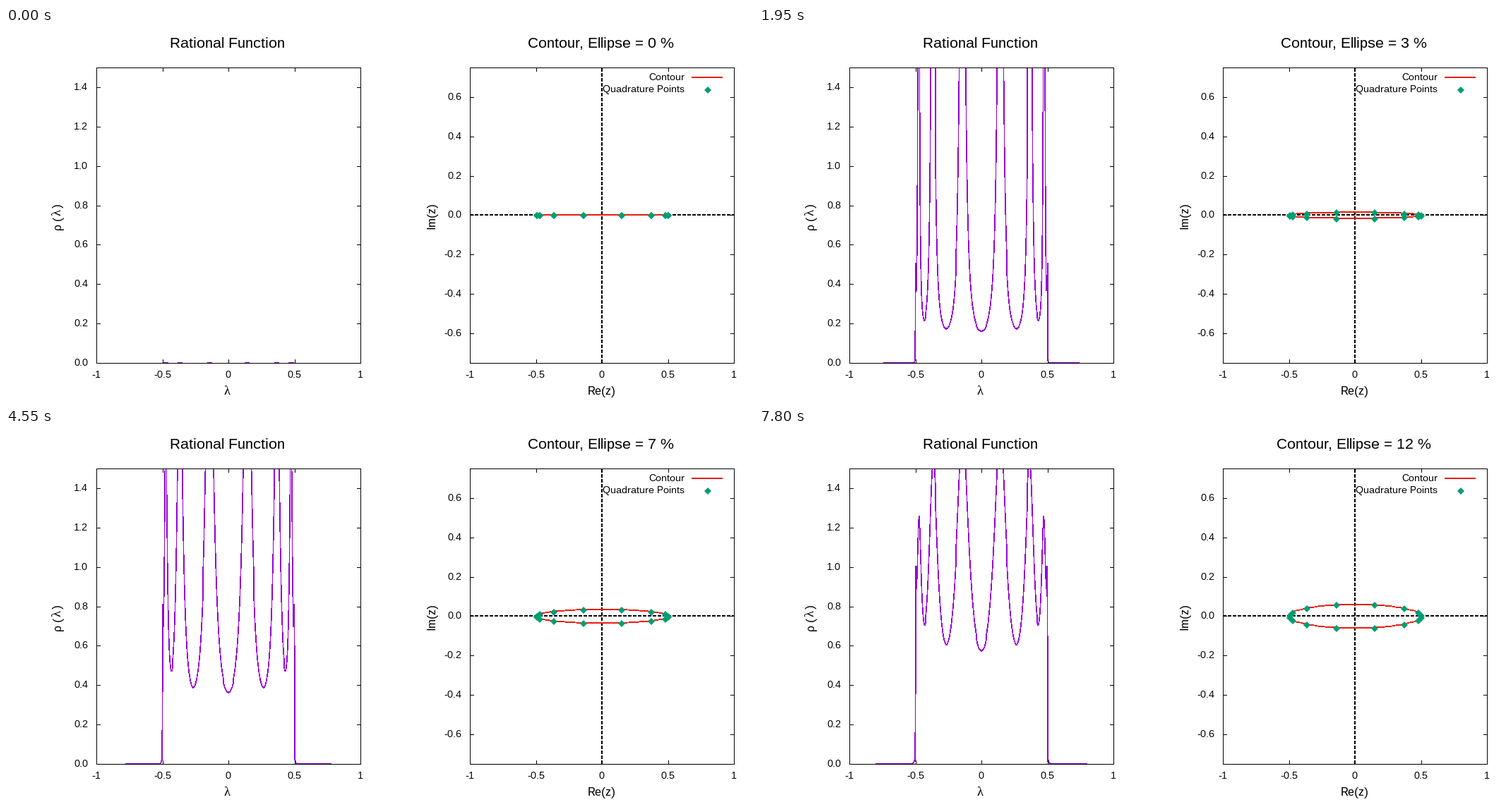
A matplotlib script for the animation above (8000 ms loop, 1058x529 px).

```python
import numpy as np
import matplotlib.pyplot as plt
from matplotlib.animation import FuncAnimation
from matplotlib.patches import Rectangle

W, H, DPI = 1058, 529, 64
PT = 72 / DPI                      # points per pixel
INTERVAL, LOOP, HOLD = 50, 8000, 650
TOP, BOTTOM = 56, 475
LEFT_X, RIGHT_X, SIDE = 128, 657, 374
PURPLE, RED, GREEN = "#9400d3", "#e51e10", "#009e73"
RADIUS = 0.5

plt.rcParams.update({
    "font.family": "Liberation Sans",
    "text.hinting": "native",
    "text.hinting_factor": 1,
    "path.simplify": False,
})

fig = plt.figure(figsize=(W / DPI, H / DPI), dpi=DPI, facecolor="white")
ax = fig.add_axes([0, 0, 1, 1])
ax.set(xlim=(0, W), ylim=(H, 0))
ax.axis("off")


def label(x, y, s, px=14, ha="center", **kw):
    return ax.text(x, y, s, fontsize=px * PT, ha=ha, va="baseline",
                   rotation_mode="anchor", zorder=6, **kw)


def stroke(xs, ys, color="black", px=0.6, z=2, **kw):
    """Aliased line: every touched pixel is filled, so 0.6 paints two."""
    line, = ax.plot(xs, ys, color=color, lw=px * PT, zorder=z,
                    antialiased=False, snap=False, **kw)
    return line


def diamonds(xs, ys):
    line, = ax.plot(xs, ys, "D", ms=7 * PT, color=GREEN, mew=0, zorder=4,
                    antialiased=False)
    return line


def thin(xs, ys):
    stroke(np.add(xs, 0.5), np.add(ys, 0.5), px=0.9, z=5,
           solid_capstyle="projecting", solid_joinstyle="miter")


def panel(x0, y_low, y_high, y_ticks):
    """Frame with mirrored inward ticks; returns data-to-pixel maps."""
    x1 = x0 + SIDE

    def to_x(v):
        return np.floor(x0 + (np.asarray(v) + 1) * SIDE / 2 + 0.5)

    def to_y(v):
        scale = (BOTTOM - TOP) / (y_high - y_low)
        return np.ceil(BOTTOM - (np.asarray(v) - y_low) * scale - 0.5)

    thin([x0, x1, x1, x0, x0], [TOP, TOP, BOTTOM, BOTTOM, TOP])
    for v in (-1, -0.5, 0, 0.5, 1):
        x = to_x(v)
        thin([x, x], [BOTTOM, BOTTOM - 5])
        thin([x, x], [TOP, TOP + 5])
        label(x - 0.5, 496, f"{v:g}")
    for v in y_ticks:
        y = to_y(v)
        thin([x0, x0 + 5], [y, y])
        thin([x1, x1 - 5], [y, y])
        label(x0 - 12, y + 4, f"{v:.1f}", ha="right")
    return to_x, to_y


lx, ly = panel(LEFT_X, 0, 1.5, np.arange(8) * 0.2)
rx, ry = panel(RIGHT_X, -0.75, 0.75, np.arange(-3, 4) * 0.2)

# Titles and axis names
label(313.5, 28, "Rational Function", 21)
title = label(842.5, 28, "", 21)
label(313.5, 520, "λ", 19, family="Liberation Serif")
label(843.5, 520, "Re(z)", 17)
label(607, 266, "Im(z)", 17, rotation=90)
for y, s in ((281, "ρ"), (270, "("), (252, ")")):
    label(78, y, s, 17, rotation=90)
label(78, 262, "λ", 19, rotation=90, family="Liberation Serif")

# Zero axes and key
dash = dict(linestyle=(0, (4 / 0.6, 3 / 0.6)), dash_capstyle="butt")
stroke([RIGHT_X, RIGHT_X + SIDE], [ry(0)] * 2, z=1, **dash)
stroke([rx(0)] * 2, [BOTTOM, TOP], z=1, **dash)
label(961, 74, "Contour", ha="right")
label(961, 91, "Quadrature Points", ha="right")
stroke([972, 1014], [70, 70], RED)
diamonds([993.5], [87.5])

# Half-contour Gauss-Legendre quadrature
nodes, weights = np.polynomial.legendre.leggauss(8)
theta = np.pi / 2 * (1 - nodes)
lam = np.linspace(-1, 1, 401)
phi = np.linspace(0, 2 * np.pi, 101)

curve = stroke([], [], PURPLE, z=3)
clip = Rectangle((LEFT_X, TOP), SIDE + 1, BOTTOM - TOP + 1, transform=ax.transData)
curve.set_clip_path(clip)
contour = stroke([], [], RED)
points = diamonds([], [])


def ellipse(t, a):
    return RADIUS * (np.cos(t) + 1j * a * np.sin(t))


def rho(x, a):
    z = ellipse(theta, a)
    dz = RADIUS * (-np.sin(theta) + 1j * a * np.cos(theta))
    return np.abs(0.5 * (weights * dz / (z - x[:, None])).imag.sum(axis=1))


def filter_curve(percent):
    if percent == 0:
        # flat contour: only specks next to the inner poles remain
        poles = ellipse(theta, 0).real[1:-1]
        near = np.abs(lam[:, None] - poles).min(axis=1) < 0.016
        return lam, np.where(near, 0.0, np.nan)
    reach = 0.69 + 0.043 * np.log(percent)
    x = np.clip(lam, -reach, reach)
    return x, rho(x, percent / 100)


def update(i):
    percent = i * INTERVAL // HOLD
    a = percent / 100
    x, y = filter_curve(percent)
    curve.set_data(lx(x), ly(y))
    z = ellipse(phi, a)
    contour.set_data(rx(z.real), ry(z.imag))
    q = ellipse(np.concatenate([theta, -theta]), a)
    points.set_data(rx(q.real) + 0.5, ry(q.imag) + 0.5)
    title.set_text(f"Contour, Ellipse = {percent} %")
    return curve, contour, points, title


anim = FuncAnimation(fig, update, frames=LOOP // INTERVAL, interval=INTERVAL,
                     repeat=True, repeat_delay=0, blit=False)
plt.show()
```
